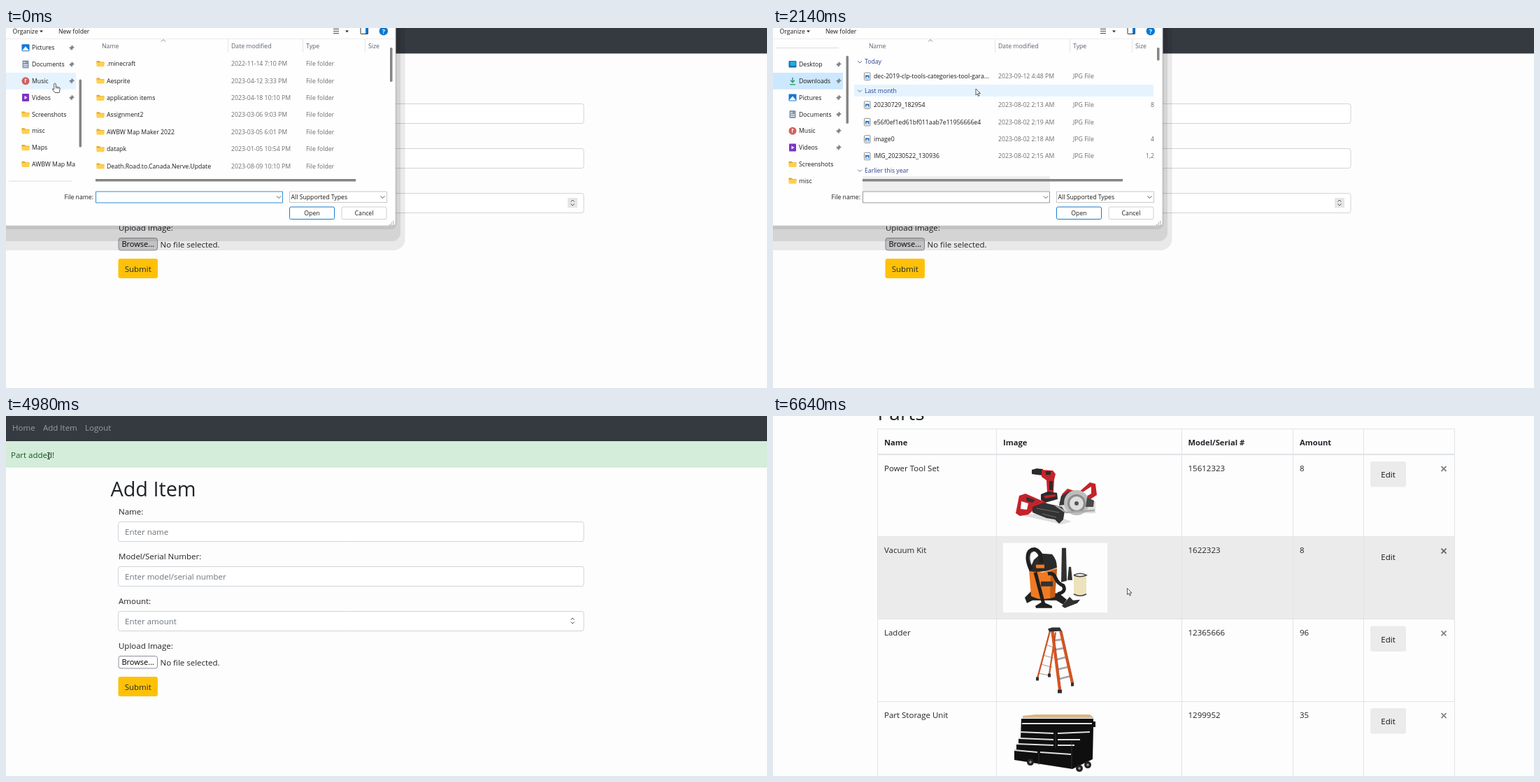
Recreate the animation shown at these times as an HTML page with a canvas. Size 1088x515 px, loop 6.66 s.

```html
<!DOCTYPE html>
<html lang="en">
<head>
<meta charset="utf-8">
<title>Add item</title>
<style>
  html, body { margin: 0; width: 100%; height: 100%; overflow: hidden; background: #fdfdfd; }
  canvas { display: block; }
</style>
</head>
<body>
<canvas id="stage" width="1088" height="515"></canvas>
<script>
const ctx = document.getElementById('stage').getContext('2d');
const LOOP = 6660, INK = '#212529', GREY = '#6d6d6d', LINE = '#e0e4e8';

// Drawing helpers
function text(str, x, midY, color = INK, size = 11.5, align = 'left', weight = 400) {
  ctx.font = `${weight} ${size}px "Open Sans", "Noto Sans", sans-serif`;
  ctx.fillStyle = color;
  ctx.textAlign = align;
  ctx.fillText(str, x, midY + size * 0.36);
}
const small = (str, x, y, color = '#1b1b1b', align) => text(str, x, y, color, 8.7, align);
function rect(color, x, y, w, h) {
  ctx.fillStyle = color;
  ctx.fillRect(x, y, w, h);
}
function box(x, y, w, h, radius, fill, border) {
  ctx.beginPath();
  ctx.roundRect(x, y, w, h, radius);
  if (fill) { ctx.fillStyle = fill; ctx.fill(); }
  if (border) { ctx.strokeStyle = border; ctx.lineWidth = 1; ctx.stroke(); }
}
function disc(color, x, y, r) {
  box(x - r, y - r, 2 * r, 2 * r, r, color);
}
function fill(color, d) {
  ctx.fillStyle = color;
  ctx.fill(new Path2D(d));
}
function stroke(color, width, d) {
  ctx.strokeStyle = color;
  ctx.lineWidth = width;
  ctx.stroke(new Path2D(d));
}
function at(x, y, draw) {
  ctx.save();
  ctx.translate(x, y);
  draw();
  ctx.restore();
}
function clipped(x, y, w, h, draw) {
  ctx.save();
  ctx.beginPath();
  ctx.rect(x, y, w, h);
  ctx.clip();
  draw();
  ctx.restore();
}
const smooth = (t, from, to) => {
  const p = Math.min(1, Math.max(0, (t - from) / (to - from)));
  return p * p * (3 - 2 * p);
};

// Pointer path: time, x, y
const PATH = [
  [0, 70, 79], [560, 69, 84], [680, 68, 90], [750, 67, 85], [1180, 67, 84], [1550, 190, 122],
  [1850, 255, 108], [2140, 289.5, 86.5], [2330, 289, 86], [2540, 240, 68], [2640, 240, 68],
  [2940, 442, 264], [3060, 442, 264], [3480, 213, 355], [3610, 207, 346], [3690, 205, 345],
  [3800, 193, 343], [4560, 193, 343], [4980, 61, 52], [5220, 44, 19], [5340, 37, 18],
  [5580, 37, 18], [5900, 340, 148], [6230, 506, 246], [LOOP, 506, 246]
];
function pointerAt(t) {
  const i = Math.max(1, PATH.findIndex(key => key[0] > t));
  const [t0, x0, y0] = PATH[i - 1], [t1, x1, y1] = PATH[i];
  const p = smooth(t, t0, t1);
  return { x: x0 + (x1 - x0) * p, y: y0 + (y1 - y0) * p };
}
function drawPointer(t, { x, y }) {
  const hand = t < 1200 && x < 100 || t > 3450 && t < 3780 && y > 330 || t > 5050 && t < 5580 && y < 30;
  const beam = t > 4900 && t < 5100 && y > 46 && y < 62;
  at(x, y, () => {
    if (beam) return stroke('#333', 1, 'M-2 .5H2M0 .5V9.5M-2 9.5H2');
    const d = hand
      ? 'M-1.3 1Q0-1 1.3 1V5L6 6Q7.5 6.5 7.2 8L6.2 13.5H0L-3.8 8.6Q-3.6 7-1.3 9Z'
      : 'M.5.5V9.5L2.6 7.6 4 11 5.5 10.3 4.1 7H7Z';
    fill('#fff', d);
    stroke('#333', 0.8, d);
    if (hand) stroke('#333', 0.7, 'M1.3 5V7.5M3.3 6V8M5.2 6.5V8.3');
  });
}

// Web pages
function navbar(t) {
  rect('#343a40', 0, 0, 1088, 36.5);
  text('Home', 9, 17, t > 5050 && t < 5580 ? '#c4c6c8' : '#9b9ea1');
  text('Add Item', 53, 17, '#9b9ea1');
  text('Logout', 113, 17, '#9b9ea1');
}
function field(label, y, content, color) {
  text(label, 161, y - 14);
  box(160.5, y + 0.5, 665.5, 28, 3, '#fff', '#ced4da');
  text(content, 170, y + 15, color);
}
function formPage(t) {
  const added = t >= 3810, picked = t >= 3010;
  const color = added ? '#6c757d' : '#495057';
  navbar(t);
  if (added) {
    rect('#d4edda', 0, 36, 1088, 37);
    rect('#c3e6cb', 0, 72.5, 1088, 1);
    text('Part added!', 7, 56, '#155724');
  }
  at(0, added ? 43 : 0, () => {
    text('Add Item', 149.5, 62, INK, 28.8);
    field('Name:', 108, added ? 'Enter name' : 'Part Storage Unit', color);
    field('Model/Serial Number:', 172, added ? 'Enter model/serial number' : '1299952', color);
    field('Amount:', 236, added ? 'Enter amount' : '35', color);
    if (!added) rect('#e6e6e8', 803, 243, 14, 14);
    stroke('#555', 1, 'M807.5 248.5L810 246 812.5 248.5M807.5 251.5L810 254 812.5 251.5');
    text('Upload Image:', 161, 286);
    box(161, 300.5, 55.5, 17.5, 3, added ? '#fdfdfd' : picked ? '#ececee' : '#d2d2d6', '#8f8f9d');
    text('Browse...', 188.7, 309.5, '#000', 11, 'center', 500);
    text(picked && !added ? 'dec-2019-clp-tools-categories-tool-garage.jpg.imgtransform.82.1280.jpg'
      : 'No file selected.', 220.5, 309.5);
    box(160.5, 330, 56.5, 28, 3, t > 3480 && !added ? '#fab90b' : '#ffc107');
    text('Submit', 188.7, 344.5, INK, 11.5, 'center');
  });
}

// Product pictures, each about 149 by 99
function powerTools() {
  fill('#dedede', 'M26 78L84 91 98 87 62 74ZM78 58H132V75H84Z');
  // Drill
  fill('#2a2a2a', 'M41 13L48 11 57 12V21L48 20 41 19Z');
  fill('#c4232b', 'M55 13L71 14 75 19 73 27 72 45H63L62 28 55 23Z');
  fill('#2a2a2a', 'M61 15H68V20H61ZM66 29H71V42H66ZM54 48L64 44 77 46 78 55 60 60 54 56Z');
  fill('#c4232b', 'M58 50L75 48V51L60 54Z');
  // Reciprocating saw
  fill('#c4232b', 'M18 75L23 50 32 47 48 54 62 60 56 70 44 70 36 77 24 79ZM26 58L25 69 34 70 36 61Z');
  fill('#333', 'M33 52L46 56 42 60 34 58ZM42 66L58 60 84 66 88 72 86 84 80 90 74 84 62 82 42 74Z');
  stroke('#6c6c6c', 1.2, 'M48 68L80 74M56 76L76 81');
  // Circular saw
  fill('#c4232b', 'M84 48L92 40 108 45 124 31 132 33 134 49 120 58 88 60Z');
  fill('#fdfdfd', 'M112 46L126 37 126 47 119 51Z');
  fill('#383838', 'M83 50L94 44 102 50 96 62 80 64Z');
  disc('#bdbdbd', 105, 60, 18);
  disc('#8c8c8c', 105, 61, 13);
  disc('#dedede', 105, 61, 10);
  disc('#555', 105, 61, 3);
  fill('#484848', 'M120 52L130 57 129 66H118Z');
  stroke('#a8a8a8', 2.4, 'M75 64L90 74 131 71');
}
function vacuum() {
  fill('#222', 'M31 78L40 69 80 72 91 81 86 88 76 82 42 82 34 86Z');
  fill('#f07a22', 'M37 38L56 42 77 36 74 77Q56 84 40 76Z');
  fill('#c65d14', 'M68 40L77 37 74 77 67 79Z');
  fill('#2a2a2a', 'M37 40L44 24 54 15 70 16Q77 24 77 35Q56 44 37 40Z');
  rect('#f07a22', 47, 31, 12, 5);
  rect('#333', 54, 55, 17, 7);
  stroke('#1f1f1f', 6, 'M40 38Q32 20 38 12Q46 5 53 16L55 28');
  stroke('#555', 0.8, 'M39 30Q35 20 40 13Q46 9 50 16');
  stroke('#1f1f1f', 5, 'M64 44Q72 42 75 50Q78 58 86 61Q91 70 78 73');
  stroke('#1f1f1f', 5, 'M46 42L58 88');
  fill('#1f1f1f', 'M46 90L56 84 70 90V93H47Z');
  fill('#303030', 'M84 7H90L91 54 83 56ZM94 34H97L99 53H92ZM84 90L95 77 100 82 110 81 106 86 88 93Z');
  fill('#ece3bd', 'M101 46H119V73Q110 78 101 73Z');
  stroke('#444', 1.6, 'M101 46Q110 41 119 46Q110 50 101 46M101 73Q110 78 119 73');
}
function ladder() {
  stroke('#9a9a9a', 1, 'M62 28L76 33M58 43L72 47M55 56L70 60M52 69L68 72');
  stroke('#a5a5a5', 2.6, 'M72 22L86 20M74 35L89 32M76 49L92 45M78 63L95 59M79 77L98 72');
  stroke('#cf5222', 2.2, 'M67 8L49 76M75 10L66 70');
  stroke('#d8541f', 3.6, 'M70 8L81 94M82 8L99 84');
  stroke('#a83c12', 0.8, 'M72 8L83 94M84 8L101 84');
  fill('#303030', 'M64 5L70 3H81L84 8 66 9ZM47 74H51V79H47ZM64 69H68V74H64ZM78 92H84V97H78ZM97 82H101V87H97Z');
}
function toolChest() {
  fill('#0f0f0f', 'M26 16H129V20H132V28H129L128 74 99 88 16 75V60H19V52H22V44H25Z');
  fill('#d9b682', 'M28 12L46 10H124L130 15H28Z');
  stroke('#e0e0e0', 2, 'M27 23H127M24 35L72 37M78 37L124 35M22 44L72 46M78 46L110 46M19 52L72 54M78 54L102 54M16 61L49 64M53 64L97 67');
  stroke('#3a3a3a', 0.8, 'M75 37V58M51 64V82M98 48V87');
  [[39, 78], [109, 87], [121, 82]].forEach(([x, y]) => {
    disc('#222', x, y, 5);
    disc('#999', x, y, 1.8);
  });
}
const PARTS = [
  ['Power Tool Set', '15612323', '8', powerTools],
  ['Vacuum Kit', '1622323', '8', vacuum],
  ['Ladder', '12365666', '96', ladder],
  ['Part Storage Unit', '1299952', '35', toolChest]
];
function partsPage(t, pointer) {
  const scroll = Math.round(66 * smooth(t, 6240, 6640));
  at(0, -scroll, () => {
    navbar(t);
    text('Parts', 149.5, 62, INK, 28);
    ['Name', 'Image', 'Model/Serial #', 'Amount'].forEach((title, i) =>
      text(title, [159, 329, 593.5, 753][i], 103.5, INK, 11.2, 'left', 700));
    PARTS.forEach(([name, model, amount, picture], i) => {
      const top = 121 + i * 117.7, y = pointer.y + scroll - top;
      const hover = y >= 0 && y < 117.7 && pointer.x > 150;
      if (hover) {
        rect('#ebebeb', 150, top, 825, 117.7);
        rect('#fdfdfd', 329, top + 9, 149, 99.5);
      } else if (t >= 6290) box(854, top + 10, 51, 36.5, 3, '#ebebeb');
      text(name, 159, top + 19.5);
      text(model, 593.5, top + 19.5);
      text(amount, 753, top + 19.5);
      text('Edit', 879.5, top + 29, '#111', 11.5, 'center');
      at(959, top + 20.5, () => stroke(hover ? '#666' : '#858585', 1.8, 'M-3.5-3.5L3.5 3.5M3.5-3.5L-3.5 3.5'));
      at(329, top + 9, picture);
      rect(LINE, 150, Math.round(top + 117.3), 825, 1);
    });
    rect(LINE, 150, 84, 825, 1);
    rect(LINE, 150, 120, 825, 2);
    [149, 319, 584, 743, 844, 974].forEach(x => rect(LINE, x, 84, 1, 520));
  });
}

// File dialog
function folderIcon(x, y) {
  fill('#e5a823', `M${x} ${y - 4}h4l1.5 1.5h5.5v3h-11z`);
  box(x, y - 1.8, 11, 6, 1, '#ffd04f');
}
function jpgIcon(x, y) {
  box(x + 0.5, y - 5, 8.5, 10.5, 1, '#fff', '#8a8a8a');
  rect('#2378c8', x + 2, y - 1.5, 5.5, 5);
  fill('#fff', `M${x + 2.5} ${y + 3}l2.2-3 2.2 3z`);
}
const PLACES = ['Desktop', 'Downloads', 'Pictures', 'Documents', 'Music', 'Videos',
  'Screenshots', 'misc', 'Maps', 'AWBW Map Maker 2022'];
function placeIcon(i, y) {
  const x = 22.5;
  if (i > 5) return folderIcon(x, y);
  if (i === 0) { box(x, y - 5, 11, 9.5, 1, '#0f6fb5'); rect('#27a9dc', x + 2, y - 4, 8, 6); }
  if (i === 1) stroke('#20936b', 1.3, `M28 ${y - 5}v7M25 ${y - 1}l3 3 3-3M24 ${y + 5}h8`);
  if (i === 2) { box(x, y - 5, 11, 10, 1, '#1478d4'); fill('#fff', `M23 ${y + 4}l5-6 5 6z`); }
  if (i === 3) {
    box(x + 1, y - 5.5, 9, 11, 1, '#8296ad');
    stroke('#fff', 1, `M25 ${y - 2.5}h3M25 ${y + 0.5}h6M25 ${y + 3}h6`);
  }
  if (i === 4) {
    disc('#d0625c', x + 5.5, y, 5.5);
    stroke('#fff', 1.1, `M27.5 ${y + 2.5}v-5l2 1`);
  }
  if (i === 5) {
    box(x + 0.5, y - 5.5, 10, 11, 1, '#7b35c4');
    fill('#fff', `M26.5 ${y - 2.5}l4 2.5-4 2.5z`);
  }
}
function sidebar(t, pointer) {
  const p = smooth(t, 60, 670), shift = 71.4 * (p - 1), pitch = 23.8;
  clipped(0, 16, 112, 211, () => {
    if (pointer.x < 100) {
      const row = Math.floor((pointer.y - 16.4) / pitch);
      rect('#e5f3ff', 0, 16.4 + row * pitch, 100, pitch);
    }
    if (t >= 1040) rect(t < 2560 ? '#cce8ff' : '#d9d9d9', 0, 64, 100, pitch);
    rect('#ddd', 4, 28 + shift, 90, 1);
    rect('#ddd', 4, 290 + shift, 90, 1);
    PLACES.forEach((name, i) => {
      const y = 52 + shift + i * pitch;
      placeIcon(i, y);
      clipped(0, 0, 99, 300, () => small(name, 37, y));
      if (i < 6) at(94, y, () => fill('#7d8790', 'M0-4L4 0 2 .5 0 4-1.5 1.8-4 4-1.8 1.5-4 0-.5-2Z'));
    });
    box(104.5, 73.5 - 33.7 * p, 3.5, 97, 1.5, '#858585');
  });
}
const FOLDERS = [
  ['.minecraft', '2022-11-14 7:10 PM'], ['Aesprite', '2023-04-12 3:33 PM'],
  ['application items', '2023-04-18 10:10 PM'], ['Assignment2', '2023-03-06 9:03 PM'],
  ['AWBW Map Maker 2022', '2023-03-05 6:01 PM'], ['datapk', '2023-01-05 10:54 PM'],
  ['Death.Road.to.Canada.Nerve.Update', '2023-08-09 10:10 PM']
];
// Centre, name, date, size; rows without a date are group headings
const DOWNLOADS = [
  [48, 'Today'],
  [69, 'dec-2019-clp-tools-categories-tool-gara...', '2023-09-12 4:48 PM', ''],
  [89.5, 'Last month'],
  [110, '20230729_182954', '2023-08-02 2:13 AM', '8'],
  [134.4, 'e56f0ef1ed61bf011aab7e11956666e4', '2023-08-02 2:19 AM', ''],
  [158.8, 'image0', '2023-08-02 2:18 AM', '4'],
  [183.2, 'IMG_20230522_130936', '2023-08-02 2:15 AM', '1,2'],
  [203.5, 'Earlier this year']
];
function fileRow(y, name, date, type) {
  small(name, 144, y);
  small(date, 322, y, GREY);
  small(type, 429, y, GREY);
}
function fileList(t, pointer) {
  if (t < 1160) {
    FOLDERS.forEach(([name, date], i) => {
      const y = 51 + i * 24.4;
      folderIcon(129.5, y);
      fileRow(y, name, date, 'File folder');
    });
  } else {
    rect('#eee', 128, 212, 268, 21);
    DOWNLOADS.forEach(([y, name, date, size], i) => {
      const half = date ? 12 : 8.5;
      const hover = pointer.x > 116 && pointer.x < 544 && Math.abs(pointer.y - y) < half;
      const selected = i === 1 && t >= 2560;
      if (hover || selected) rect(selected ? '#cce8ff' : '#e5f3ff', 116, y - half, 428, half * 2);
      if (date) {
        jpgIcon(130, y);
        fileRow(y, name, date, 'JPG File');
        small(size, 545, y, GREY, 'right');
      } else {
        stroke('#4a5f9e', 0.9, `M121 ${y - 1}l3 3 3-3`);
        small(name, 131, y, '#2b3f8c');
      }
    });
  }
  box(549, 28, 3.5, t < 1160 ? 49 : 18.5, 1.5, '#858585');
  rect('#858585', 128, 216, 372, 3.5);
}
function dialog(t, pointer) {
  box(-40, -40, 610.5, 358, 16, 'rgba(0,0,0,.08)');
  box(-40, -40, 604, 345, 12, 'rgba(0,0,0,.09)');
  box(-40, -40, 599, 328, 9, 'rgba(0,0,0,.08)');
  box(-40, -40, 597, 323, 4, '#fefefe', '#c9c9c9');

  small('Organize', 9.5, 4.5);
  fill('#333', 'M48 3.5h5l-2.5 3zM485 3.5h5l-2.5 3z');
  small('New folder', 75, 4.5);
  stroke('#444', 1, 'M468 1.5h8M468 4.5h8M468 7.5h8');
  box(507, -1, 10.5, 9.5, 0.5, '#fff', '#333');
  rect('#1478d4', 514, 0, 3.5, 8);
  disc('#0a78d0', 539.8, 4.3, 6.2);
  text('?', 539.8, 4.5, '#fff', 9, 'center', 700);
  rect('#ececec', 0, 15, 557, 1);

  [['Name', 137], ['Date modified', 322], ['Type', 429], ['Size', 518]].forEach(([title, x]) =>
    small(title, x, 26, '#5a6270'));
  [317, 424, 513].forEach(x => rect('#e5e5e5', x, 16, 1, 19));
  stroke('#777', 0.9, 'M222 19.5l3-3 3 3');
  sidebar(t, pointer);
  fileList(t, pointer);

  const typing = t < 1040;
  small('File name:', 125, 242, '#1b1b1b', 'right');
  box(128.5, 234, 267, 16, 0, '#fff', typing ? '#2f8dd6' : '#999');
  if (t > 440 && t < 980) rect('#000', 130, 236, 1, 12);
  if (t >= 2560) clipped(130, 235, 254, 14, () =>
    small('dec-2019-clp-tools-categories-tool-garage.jpg.imgtransform.82.1280.jpg', 132, 242));
  box(405.5, 234, 139, 15.5, 0, '#fff', '#c8c8c8');
  small('All Supported Types', 407.5, 242);
  stroke('#555', 1, 'M387 240.5l3 3 3-3M535.5 240.5l3 3 3-3');
  const overOpen = pointer.x > 406 && pointer.y > 256;
  box(405.5, 256, 64, 17.5, 2, overOpen ? '#e5f1fb' : '#fff', '#1979ca');
  small('Open', 437.5, 265, '#1b1b1b', 'center');
  box(480, 256, 64, 17.5, 2, '#fff', '#cfcfcf');
  small('Cancel', 512, 265, '#1b1b1b', 'center');
  for (let i = 0; i < 3; i++)
    for (let j = 0; j <= i; j++) rect('#999', 553 - j * 2.5, 276 + i * 2.5, 1.4, 1.4);
}

function frame(now) {
  const t = now % LOOP, pointer = pointerAt(t);
  rect('#fdfdfd', 0, 0, 1088, 515);
  if (t < 5580) formPage(t);
  else partsPage(t, pointer);
  if (t < 3010) dialog(t, pointer);
  drawPointer(t, pointer);
  requestAnimationFrame(frame);
}
requestAnimationFrame(frame);
</script>
</body>
</html>
```
